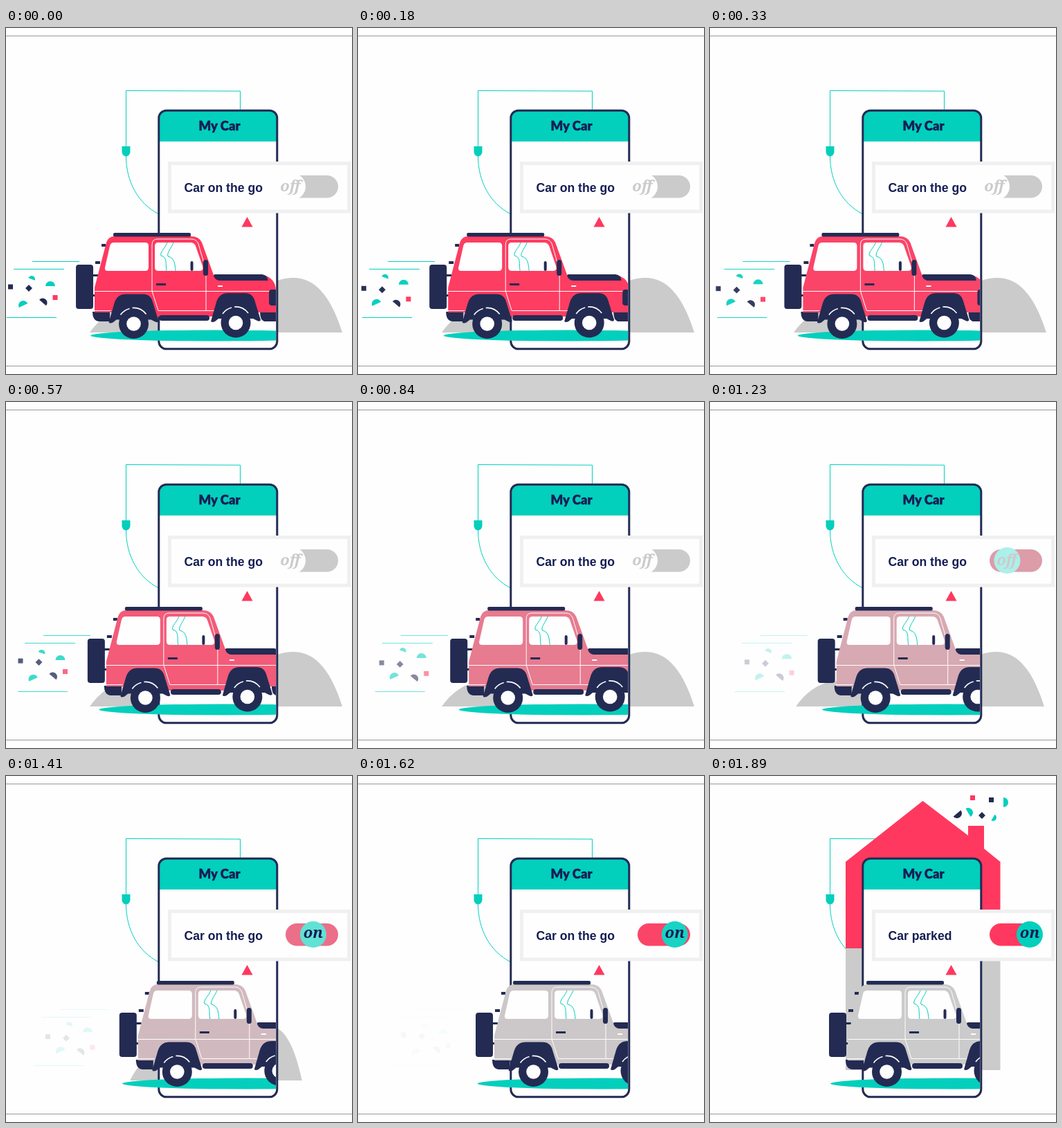
Recreate the animation shown at these times as an HTML page. Size 500x500 px, loop 2730 ms.

```html
<!DOCTYPE html>
<html lang="en">
<head>
<meta charset="utf-8">
<title>My Car</title>
<style>
  html, body { margin: 0; width: 100%; height: 100%; overflow: hidden; background: #fefefe; }
  svg { display: block; width: 100%; height: 100%; }
  .navy { fill: #232b53; }
  .teal { fill: #03cfbd; }
  .red { fill: #ff385f; }
  .grey { fill: #cbcbcb; }
  .white { fill: #fefefe; }
  .ink { fill: #141d54; }
  .wire { fill: none; stroke: #03cfbd; }
  .seam { fill: none; stroke: #fefefe; }
  .label { font: bold 17.6px "Liberation Sans", Arial, sans-serif; }
  .title { font: 900 18.5px Lato, sans-serif; text-anchor: middle; stroke: #141d54; stroke-width: .4; }
  .state { font: italic bold 22px "Noto Serif", "Liberation Serif", serif; text-anchor: middle; }
</style>
</head>
<body>
<svg viewBox="0 0 500 500">
  <defs>
    <clipPath id="screen"><path d="M0 0H390V500H0z"/></clipPath>
    <path id="half" d="M-1 0A1 1 0 0 1 1 0z"/>
    <g id="wheel">
      <path class="navy" d="M-36-2L-28-30Q-24-43-11-43H13Q25-43 28-30L36-4Q35-1 31-3L25-6H-25L-30-2Q-34 0-36-2z"/>
      <circle class="navy" r="21.5"/>
      <path class="seam" stroke-width="1.6" d="M-19-13A23 23 0 0 1-6-22M-2-23A23 23 0 0 1 18-14"/>
      <circle class="white" r="10.3"/>
    </g>
  </defs>

  <path stroke="#999" d="M0 11.5H500M0 488.5H500"/>
  <path class="wire" d="M338.5 118V91.2L173.5 90.5V185C173.5 222 191 254 221 269"/>
  <path class="teal" d="M167.5 171H179.5V179A6 6.5 0 0 1 167.5 179z"/>

  <path id="hill" class="grey" d="M121 440C138 417 158 403 186 403C240 403 300 420 340 402C362 382 385 361 415 361C450 361 471 393 486 440z"/>

  <g id="house">
    <path class="grey" d="M196 249H419.5V425H196z"/>
    <path class="red" d="M196 249V124L307.5 36 373 86V72H396V105L419.5 124V249z"/>
    <g id="smoke"></g>
  </g>

  <rect class="white" x="221" y="119.5" width="170.5" height="344.5" rx="11"/>
  <path class="teal" d="M221 164V131Q221 119.5 232 119.5H380Q391.5 119.5 391.5 131V164z"/>
  <rect x="220.8" y="119.2" width="171" height="344.6" rx="11" fill="none" stroke="#232b53" stroke-width="3"/>
  <text class="title ink" x="308.5" y="148">My Car</text>
  <path class="red" d="M348.5 273L356.5 287.5H340.5z"/>

  <path id="streaks" class="wire" d="M38 337.5H106M11 348.5H84M1 418.5H73"/>
  <g id="arcs"></g>
  <g id="bits"></g>

  <g clip-path="url(#screen)">
    <ellipse id="ground" class="teal" cx="302" cy="444.5" rx="180" ry="8"/>
    <g id="car">
      <g class="navy">
        <rect x="101" y="342" width="25" height="64" rx="4"/>
        <path d="M125 356h8v3h-8zM125 385h6v3h-6zM138 312h6v4h-6zM129 337h7v4h-7z"/>
        <path d="M125 410H150V424H134Q125 423 125 410z"/>
        <path d="M367 410H391V424H373Q367 422 367 410z"/>
      </g>
      <path id="body" d="M128 411V375L145 310Q148 301 157 301H267Q279 301 283 310L300 357H372Q390 362 390 380V411H360L340 395 308 417H211L185 395 155 411z"/>
      <rect class="navy" x="155" y="296" width="112" height="5.5" rx="2"/>
      <path class="white" d="M156 310H201Q206 310 206 315V346Q206 351 201 351H147Q142 351 143 346L150 315Q151 310 156 310z"/>
      <path class="white" d="M220 310H266Q272 310 274 315L284 344Q286 351 280 351H220Q215 351 215 346V315Q215 310 220 310z"/>
      <path class="wire" d="M233 310C230 318 222 324 224 329C234 331 230 342 232 351M242 310C239 318 232 325 234 330C244 332 244 342 245 351"/>
      <path class="seam" d="M128 380.5H390M127 408.5H152M211 380V313Q211 305 219 305H268Q275 305 278 312L289 350V408.500H220L211 380M289 408.500H305"/>
      <path class="white" d="M306 372h7v2h-7z"/>
      <g class="navy">
        <path d="M217 369h14v3h-14z"/>
        <rect x="266.5" y="337" width="4" height="14" rx="2"/>
        <rect x="285" y="335" width="7" height="23" rx="3.5"/>
        <path d="M300 358Q300 356 302 356H370Q378 357 378.5 365H308Q302 364 300 358z"/>
        <rect x="380" y="378" width="14" height="23" rx="4"/>
        <rect x="221" y="415" width="73" height="8" rx="4"/>
      </g>
      <use href="#wheel" x="184.5" y="427.5"/>
      <use href="#wheel" x="332" y="426"/>
    </g>
  </g>

  <rect class="white" x="236.5" y="195.5" width="259" height="69.5" stroke="#f0f0f0" stroke-width="5"/>
  <text id="status" class="label ink" x="257.5" y="237"></text>
  <rect id="track" x="404" y="213" width="76" height="32.5" rx="16.25"/>
  <g id="knob">
    <circle id="disc" r="19" cy="229"/>
    <text id="state" class="state"></text>
  </g>
</svg>
<script>
const LOOP = 2730;
const $ = id => document.getElementById(id);
const RED = [255, 56, 95], GREY = [203, 203, 203], TEAL = [3, 207, 189], WHITE = [254, 254, 254];

const half = (cls, x, y, r, turn) =>
  `<use href="#half" class="${cls}" transform="translate(${x} ${y}) rotate(${turn}) scale(${r})"/>`;
const square = (cls, x, y, turn = 0) =>
  `<rect class="${cls}" x="-3.5" y="-3.5" width="7" height="7" transform="translate(${x} ${y}) rotate(${turn})"/>`;

$('arcs').innerHTML =
  half('teal', 37, 363, 5, 20) + half('teal', 64, 373, 7, 0) + half('teal', 25, 401, 7, -25);
$('bits').innerHTML =
  half('navy', 53, 397, 6.5, 40) + square('navy', 6.5, 374) + square('navy', 33, 376, 45) +
  square('red', 71, 389.5);
$('smoke').innerHTML =
  square('red', 379.5, 31.5) + square('navy', 406.5, 34.5) + square('navy', 393, 57, 45) +
  half('teal', 424, 38, 7, 90) + half('navy', 357, 54, 7, 140) + half('teal', 373, 53, 7, 60) +
  half('teal', 409, 60, 5, 120);

// Cosine ease-in-out between two times, 0 to 1
function ease(t, from, to) {
  const p = Math.min(1, Math.max(0, (t - from) / (to - from)));
  return (1 - Math.cos(Math.PI * p)) / 2;
}
const mix = (a, b, p) => `rgb(${a.map((v, i) => Math.round(v + (b[i] - v) * p))})`;
const set = (id, name, value) => $(id).setAttribute(name, value);
const shift = (id, x, y = 0) => set(id, 'transform', `translate(${x} ${y})`);
const scaleAt = (id, x, y, sx, sy) =>
  set(id, 'transform', `translate(${x} ${y}) scale(${sx} ${sy}) translate(${-x} ${-y})`);

function draw(t) {
  const drive = ease(t, -27, 1818);
  const bob = (1 - Math.cos(2 * Math.PI * t / 540)) / 2;
  shift('car', 71 * drive);
  shift('ground', 52 * drive);
  shift('arcs', 61 * drive, -3 * bob);
  shift('bits', 61 * drive, 3 * bob);
  shift('streaks', 0.0283 * Math.min(t, 1800));
  for (const id of ['arcs', 'bits', 'streaks']) set(id, 'opacity', 1 - drive);
  set('body', 'fill', mix(RED, GREY, drive));

  // The hill slips behind the phone, then the house grows out from there
  scaleAt('hill', 303.5, 440, 1 - 0.56 * ease(t, 1185, 1600), 1);
  set('hill', 'visibility', t < 1610 ? 'visible' : 'hidden');
  const grow = 0.6 + 0.4 * ease(t, 1630, 1880);
  scaleAt('house', 307, 270, grow, grow);
  set('house', 'visibility', t < 1630 ? 'hidden' : 'visible');

  const toggle = ease(t, 877, 1799), on = toggle > 0.5;
  shift('knob', 414 + 48 * toggle);
  set('track', 'fill', mix(GREY, RED, toggle));
  set('disc', 'fill', mix(WHITE, TEAL, toggle));
  $('state').textContent = on ? 'on' : 'off';
  set('state', 'fill', on ? '#141d54' : '#cbcbcb');
  set('state', 'x', on ? 0 : -3 + 8 * toggle);
  set('state', 'y', on ? 234 : 236);
  $('status').textContent = t < 1710 ? 'Car on the go' : 'Car parked';
}

const start = performance.now();
function tick() {
  draw((performance.now() - start) % LOOP);
  requestAnimationFrame(tick);
}
tick();
</script>
</body>
</html>
```
